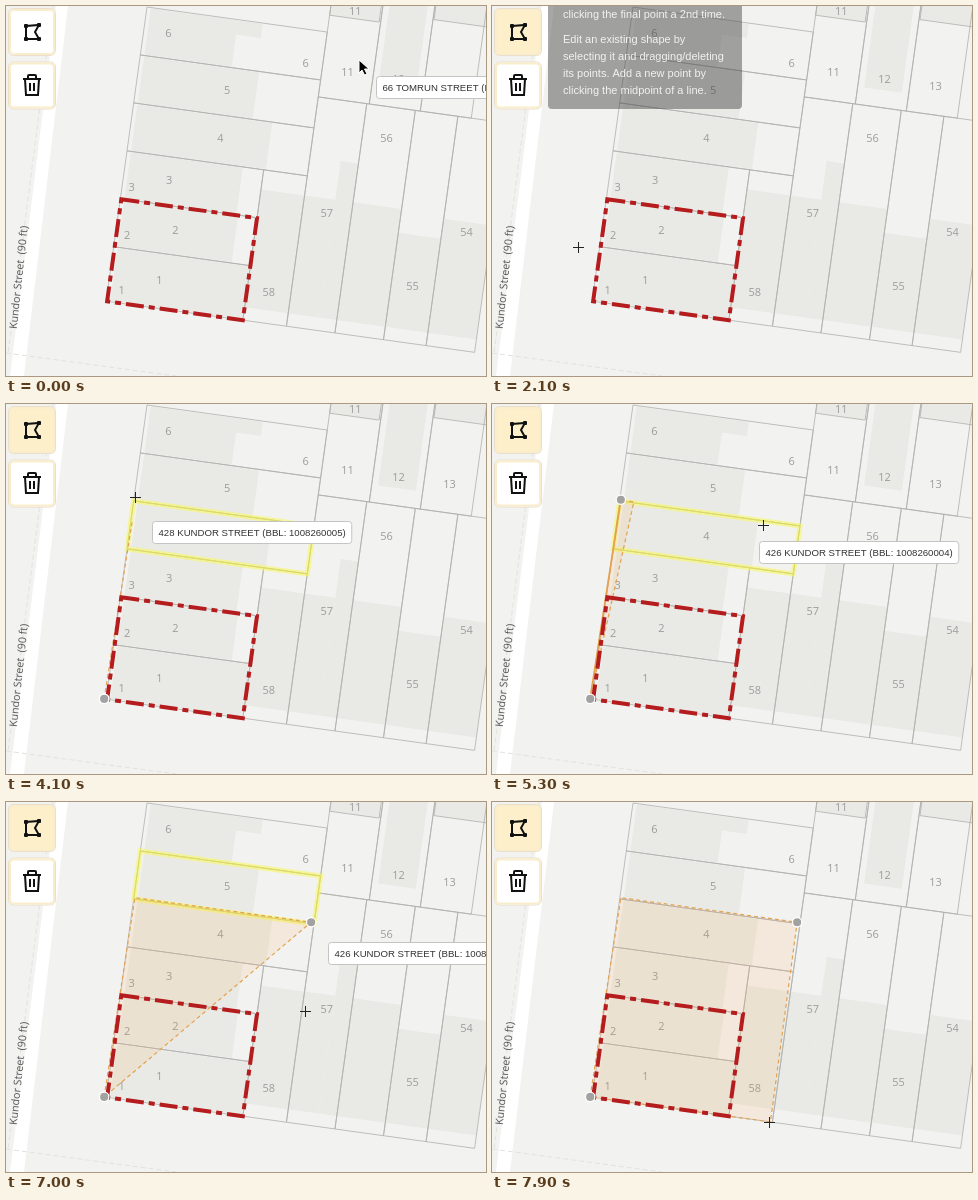
Recreate the animation shown at these times as an HTML page with a canvas. Size 480x370 px, loop 8 s.

```html
<!DOCTYPE html>
<html lang="en">
<head>
<meta charset="utf-8">
<title>Drawing a shape on a lot map</title>
<style>
html, body { margin: 0; width: 100%; height: 100%; overflow: hidden; background: #f2f2f1; }
canvas { display: block; }
</style>
</head>
<body>
<canvas id="stage" width="480" height="370"></canvas>
<script>
const ctx = document.getElementById('stage').getContext('2d');
const LOOP = 8000, STEP = 100;
const SANS = '"Liberation Sans", Arial, sans-serif';
const MAP = '"Open Sans", sans-serif';

// The block is an upright grid, turned about its top left corner.
const ORIGIN = [141, 1], TILT = 0.138;
const at = (u, v) => [
  ORIGIN[0] + u * Math.cos(TILT) - v * Math.sin(TILT),
  ORIGIN[1] + u * Math.sin(TILT) + v * Math.cos(TILT)
];

const ROW = 48.4, DEPTH = 182, SHORT = 138, BACK = 65.5, BOTTOM = 297, BUILT_END = 284;
const lots = [], buildings = [], labels = [];

// Lots along the street, numbered upwards from the corner
const rowWidths = [92, 120, 140, 117, 119, 137];
const rowLabels = [25, 91, 91, 46, 59, 50];
rowWidths.forEach((built, i) => {
  const y = i * ROW, h = i < 5 ? ROW : BOTTOM - y;
  lots.push([0, y, i < 3 ? DEPTH : SHORT, h]);
  buildings.push([4, y + 1, built - 4, h - 2]);
  labels.push([6 - i, rowLabels[i], y + h / 2]);
  if (i > 2) labels.push([6 - i, 3 + i * 2.2, y + h - 12]);
});

// Lots along the side street, numbered downwards
const edges = [SHORT, DEPTH, 231, 280, 323, 372];
const builtTops = [165, 165, 165, 189, 169];
const columnLabels = [267, 180, 98, 241, 180];
builtTops.forEach((top, i) => {
  const x = edges[i], w = edges[i + 1] - x, y = i ? BACK : 3 * ROW;
  lots.push([x, y, w, BOTTOM - y]);
  buildings.push([x, top, i === 1 ? 31 : w, BUILT_END - top]);
  labels.push([58 - i, x + w / 2, columnLabels[i]]);
});
buildings.push([213, 126, 18, BUILT_END - 126]);

// Lots behind them
for (let i = 0; i < 3; i++) {
  lots.push([DEPTH + i * 51.5, -60, 51.5, 60 + BACK]);
  labels.push([11 + i, DEPTH + (i + 0.5) * 51.5, 38]);
}
lots.push([DEPTH, -60, 50, 43], [286, -60, 70, 33]);
buildings.push([4, 1, 113, 14], [DEPTH, -60, 50, 43], [240, -60, 38, 108], [286, -60, 70, 33]);
labels.push([11, 207, -24], [6, 165, 35]);

const lot5 = lots[1], lot4 = lots[2];

// The shape being drawn, corner by corner
const corners = [at(-2, 297), at(1, 95.5), at(179, 95.5), at(180, 297)];
const placedAt = [3000, 4600, 6300];

const moves = [
  { from: 200, to: 1100, point: [23, 20] },
  { from: 1600, to: 2100, point: [87, 241] },
  { from: 2100, to: 2700, point: corners[0] },
  { from: 3300, to: 4100, point: [130, 93] },
  { from: 4200, to: 4400, point: corners[1] },
  { from: 5190, to: 5300, point: [272, 121] },
  { from: 5300, to: 5500, point: corners[2] },
  { from: 6900, to: 7000, point: [300, 209] },
  { from: 7000, to: 7500, point: corners[3] }
];

const hovers = [
  { from: 0, to: 800, text: '66 TOMRUN STREET (BBL: 1008260058)' },
  { from: 3700, to: 4100, lot: lot4, text: '426 KUNDOR STREET (BBL: 1008260004)' },
  { from: 4100, to: 4300, lot: lot4, text: '428 KUNDOR STREET (BBL: 1008260005)' },
  { from: 5200, to: 5600, lot: lot4, text: '426 KUNDOR STREET (BBL: 1008260004)' },
  { from: 5600, to: 7100, lot: lot5, text: '426 KUNDOR STREET (BBL: 1008260004)' }
];

const help = [
  'clicking the final point a 2nd time.',
  'Edit an existing shape by',
  'selecting it and dragging/deleting',
  'its points. Add a new point by',
  'clicking the midpoint of a line.'
];

const clamp = v => Math.max(0, Math.min(1, v));

function pointer(t) {
  let [x, y] = [353, 54];
  for (const { from, to, point } of moves) {
    const k = clamp((t - from) / (to - from));
    x += (point[0] - x) * k;
    y += (point[1] - y) * k;
  }
  return [x, y];
}

function shape(points, { fill, stroke, width = 1, dash = [], close = true }) {
  ctx.beginPath();
  points.forEach(p => ctx.lineTo(...p));
  if (close) ctx.closePath();
  if (fill) { ctx.fillStyle = fill; ctx.fill(); }
  if (stroke) {
    ctx.strokeStyle = stroke;
    ctx.lineWidth = width;
    ctx.setLineDash(dash);
    ctx.stroke();
    ctx.setLineDash([]);
  }
}

const line = (x0, y0, x1, y1, style) => shape([[x0, y0], [x1, y1]], { ...style, close: false });

const outlineOf = ([x, y, w, h]) => [at(x, y), at(x + w, y), at(x + w, y + h), at(x, y + h)];

function box(x, y, w, h, r, fill, stroke, width = 1) {
  ctx.beginPath();
  ctx.roundRect(x, y, w, h, r);
  if (fill) { ctx.fillStyle = fill; ctx.fill(); }
  if (stroke) { ctx.strokeStyle = stroke; ctx.lineWidth = width; ctx.stroke(); }
}

function circle([x, y], r, fill, stroke, width) {
  ctx.beginPath();
  ctx.arc(x, y, r, 0, Math.PI * 2);
  ctx.fillStyle = fill;
  ctx.fill();
  ctx.strokeStyle = stroke;
  ctx.lineWidth = width;
  ctx.stroke();
}

function write(text, x, y, font, color, align = 'left') {
  ctx.font = font;
  ctx.fillStyle = color;
  ctx.textAlign = align;
  ctx.textBaseline = 'middle';
  ctx.fillText(text, x, y);
}

function drawMap() {
  ctx.fillStyle = '#f2f2f1';
  ctx.fillRect(0, 0, 480, 370);
  shape([[50, 0], [62, 0], [18, 370], [4, 370]], { fill: '#fff' });
  const faint = { stroke: '#e2e2e0', dash: [5, 3] };
  line(47, 0, 2, 347, faint);
  line(0, 347, 170, 370, faint);
  buildings.forEach(b => shape(outlineOf(b), { fill: '#e9eae5' }));
  lots.forEach(l => shape(outlineOf(l), { stroke: '#b0b0ae', width: 0.8 }));
  labels.forEach(([n, u, v]) => write(n, ...at(u, v), '11px ' + MAP, '#9b9b9b', 'center'));
  ctx.save();
  ctx.translate(8, 323);
  ctx.rotate(-1.465);
  write('Kundor Street  (90 ft)', 0, 0, '10.7px ' + MAP, '#555');
  ctx.restore();
}

function drawHighlight(lot) {
  shape(outlineOf(lot), { stroke: 'rgba(248,248,110,.65)', width: 5 });
  shape(outlineOf(lot), { stroke: '#dcd969' });
}

function drawShape(t) {
  const placed = corners.filter((_, i) => t >= placedAt[i]);
  if (!placed.length) return [];
  const orange = '#e3a252';
  shape([...placed, pointer(t - STEP)], {
    fill: 'rgba(243,160,75,.13)', stroke: orange, width: 1.2, dash: [4, 3], close: placed.length > 1
  });
  if (placed.length === 2) shape(placed, { stroke: orange, width: 1.8, close: false });
  return [placed[0], placed[placed.length - 1]];
}

function drawButton(y, fill) {
  box(2.5, y, 47, 47, 5, fill, '#e9dfca');
  box(4, y + 1.5, 44, 44, 4, null, '#faedcc', 2);
}

function drawButtons(t) {
  drawButton(2.5, t >= 1600 ? '#fcefca' : t >= 900 ? '#f4f4f2' : '#fff');
  drawButton(56, '#fff');

  const pen = { stroke: '#111', width: 2 };
  const nodes = [[20, 20], [33, 19], [33, 33], [20, 33]];
  shape([...nodes.slice(0, 2), [29, 26], ...nodes.slice(2)], pen);
  nodes.forEach(([x, y]) => box(x - 2, y - 2, 4, 4, 1, '#111'));

  line(17, 73, 35, 73, pen);
  box(22, 69, 8, 4, 1, null, '#111', 2);
  shape([[19, 73], [20, 89], [32, 89], [33, 73]], { ...pen, close: false });
  [24, 28].forEach(x => line(x, 77, x, 85, pen));
}

function drawHelp(t) {
  const alpha = 0.86 * clamp(Math.min(t - 1500, 2200 - t) / 200);
  if (!alpha) return;
  ctx.globalAlpha = alpha;
  box(56, -40, 194, 143, 4, '#333');
  ctx.globalAlpha = clamp(alpha * 2);
  help.forEach((text, i) => write(text, 71, (i ? 16.5 : 8.5) + i * 17, '11px ' + SANS, '#fff'));
  ctx.globalAlpha = 1;
}

function drawTip(t, text) {
  // The tip stays behind once the pointer leaves the lot.
  const [x, y] = pointer(Math.min(t - 17, 6900));
  const left = Math.round(x + 17) + 0.5, top = Math.round(y + (t < 1000 ? 16 : 20)) + 0.5;
  ctx.font = '9.65px ' + SANS;
  box(left, top, ctx.measureText(text).width + 12, 22, 3, '#fff', '#c4c4c4');
  write(text, left + 6, top + 11.5, ctx.font, '#333');
}

function drawPointer(t) {
  const [x, y] = pointer(t);
  if (t >= 1400 && t < 1600) circle([x + 2, y], 19.5, 'rgba(255,255,255,.35)', '#222', 1.5);
  if (t < 1700) {
    const arrow = [[0, 0], [0, 13], [3, 10], [5.5, 15], [8, 14], [5.5, 9], [10, 9]];
    shape(arrow.map(([dx, dy]) => [x + dx, y + dy]), { fill: '#000', stroke: '#fff' });
    return;
  }
  const cx = Math.round(x) - 0.5, cy = Math.round(y) + 0.5;
  line(cx - 5.5, cy, cx + 5.5, cy, { stroke: '#222' });
  line(cx, cy - 5.5, cx, cy + 5.5, { stroke: '#222' });
}

function draw(now) {
  const t = Math.floor(now % LOOP / STEP) * STEP;
  const hover = hovers.find(h => t >= h.from && t < h.to);
  drawMap();
  if (hover && hover.lot) drawHighlight(hover.lot);
  const ends = drawShape(t);
  shape(outlineOf([1, 194, 137, 103]), { stroke: '#b51c1e', width: 4, dash: [18, 5, 6, 5] });
  ends.forEach(p => circle(p, 4.7, '#a2a2a2', '#fff', 1.3));
  drawButtons(t);
  drawHelp(t);
  if (hover) drawTip(t, hover.text);
  drawPointer(t);
  requestAnimationFrame(() => draw(performance.now() - start));
}

const start = performance.now();
draw(0);
</script>
</body>
</html>
```
